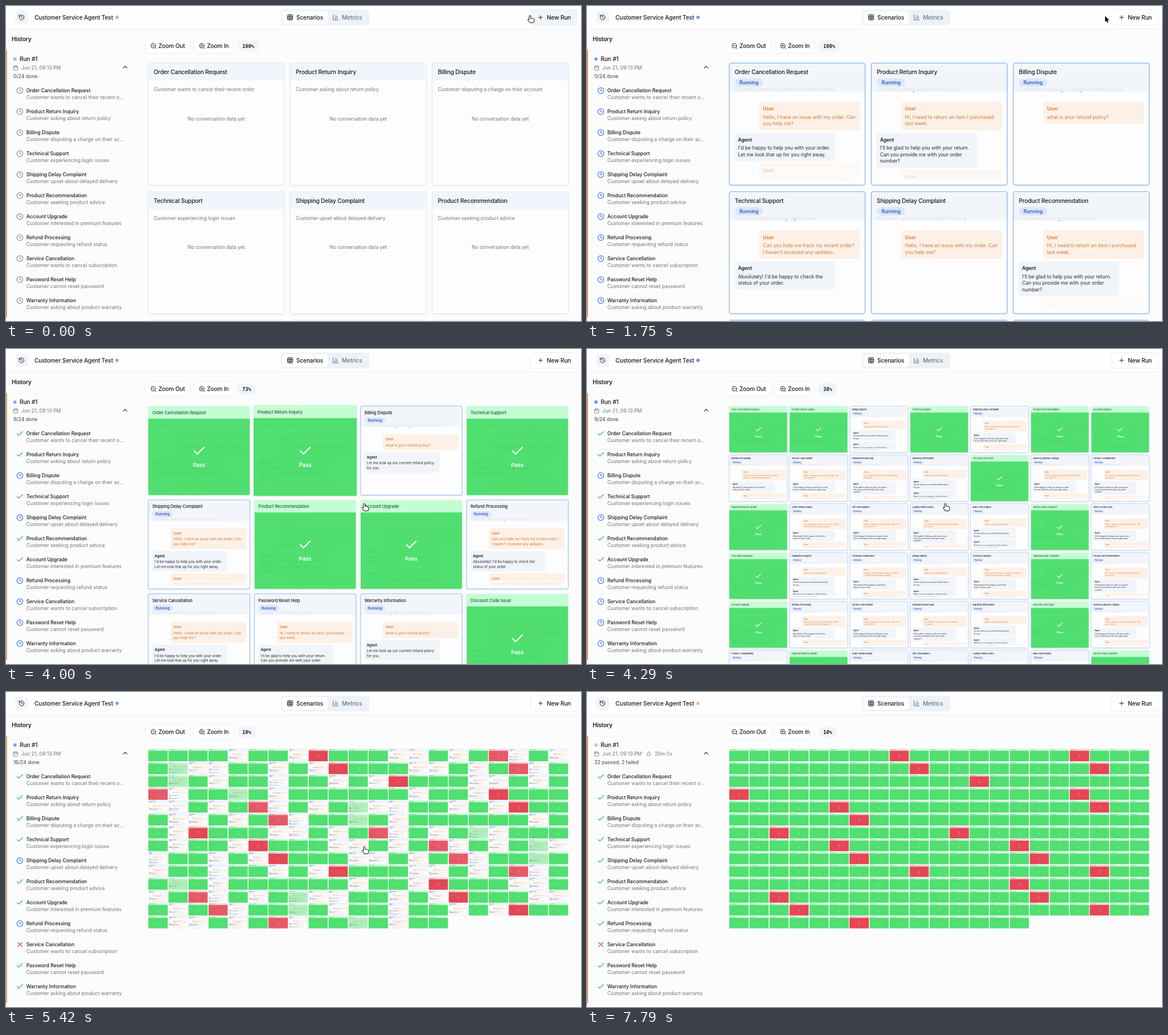
An HTML page with a canvas for the animation above (7830 ms loop, 1010 by 555 pixels).

```html
<!DOCTYPE html>
<html lang="en">
<head>
<meta charset="utf-8">
<title>Agent test run</title>
<style>
  html, body { margin: 0; width: 100%; height: 100%; overflow: hidden; background: #fcfcfd; }
  canvas { display: block; }
</style>
</head>
<body>
<canvas id="stage" width="1010" height="555"></canvas>
<script>
const ctx = document.getElementById('stage').getContext('2d');
const LOOP = 7830, START = 420, END = 7000;
const INK = '#18181b', GREY = '#6b7280', BLUE = '#2f62e0';

const icons = {
  history: 'M3 12a9 9 0 1 0 9-9 9.75 9.75 0 0 0-6.74 2.74L3 8M3 3v5h5M12 7v5l4 2',
  grid: 'M5 3h14a2 2 0 0 1 2 2v14a2 2 0 0 1-2 2H5a2 2 0 0 1-2-2V5a2 2 0 0 1 2-2zM3 9h18M3 15h18M9 3v18M15 3v18',
  chart: 'M3 3v18h18M18 17V9M13 17V5M8 17v-3',
  plus: 'M5 12h14M12 5v14',
  zoomOut: 'M19 11a8 8 0 1 1-16 0 8 8 0 0 1 16 0zM21 21l-4.35-4.35M8 11h6',
  zoomIn: 'M19 11a8 8 0 1 1-16 0 8 8 0 0 1 16 0zM21 21l-4.35-4.35M8 11h6M11 8v6',
  calendar: 'M8 2v4M16 2v4M3 10h18M5 4h14a2 2 0 0 1 2 2v14a2 2 0 0 1-2 2H5a2 2 0 0 1-2-2V6a2 2 0 0 1 2-2z',
  timer: 'M10 2h4M12 14l3-3M20 14a8 8 0 1 1-16 0 8 8 0 0 1 16 0z',
  up: 'M18 15l-6-6-6 6',
  clock: 'M22 12a10 10 0 1 1-20 0 10 10 0 0 1 20 0zM12 6v6l4 2',
  check: 'M20 6L9 17l-5-5',
  cross: 'M18 6L6 18M6 6l12 12'
};
for (const k in icons) icons[k] = new Path2D(icons[k]);
const hand = new Path2D('M-1.5 1.2C-1.5-.6 1.3-.6 1.3 1.2V5.2C2 4.6 3.5 4.8 3.7 5.7 4.6 5.2 5.8 5.6 6 6.4 7 6.1 8 6.7 8 7.8V9.5C8 11 7 12 6.7 13.5H-.2C-1 12-3 10-4 8.2-4.4 7.2-3.2 6.6-2.4 7.3L-1.5 8.2Z');
const arrow = new Path2D('M0 0V11.5L2.6 9.2 4.3 13 6.2 12.2 4.5 8.5H8Z');

const scenarios = [
  ['Order Cancellation Request', 'wants to cancel their recent order'],
  ['Product Return Inquiry', 'asking about return policy'],
  ['Billing Dispute', 'disputing a charge on their account'],
  ['Technical Support', 'experiencing login issues'],
  ['Shipping Delay Complaint', 'upset about delayed delivery'],
  ['Product Recommendation', 'seeking product advice'],
  ['Account Upgrade', 'interested in premium features'],
  ['Refund Processing', 'requesting refund status'],
  ['Service Cancellation', 'wants to cancel subscription'],
  ['Password Reset Help', 'cannot reset password'],
  ['Warranty Information', 'asking about product warranty'],
  ['Discount Code Issue', 'has an invalid discount code'],
  ['Delivery Address Change', 'wants to change address'],
  ['Product Compatibility', 'asking about compatibility'],
  ['Payment Method Update', 'updating payment details'],
  ['Order Status Inquiry', 'checking order status'],
  ['Gift Card Balance', 'checking gift card balance'],
  ['Loyalty Points Query', 'asking about loyalty points'],
  ['Bulk Order Inquiry', 'wants to place a bulk order'],
  ['Service Hours Question', 'asking about opening hours'],
  ['Store Locator Help', 'looking for a nearby store'],
  ['Price Match Request', 'requesting a price match'],
  ['Installation Support', 'needs installation help'],
  ['Feedback Submission', 'wants to leave feedback']
];

// Each message: speaker, then its lines
const talks = [
  [['User', 'Hello, I have an issue with my order. Can', 'you help me?'],
   ['Agent', "I'd be happy to help you with your order.", 'Let me look that up for you right away.'],
   ['User', 'Thank you! The tracking shows it was', 'delivered yesterday.']],
  [['User', 'Hi, I need to return an item I purchased', 'last week.'],
   ['Agent', "I'll be glad to help you with your return.", 'Can you provide me with your order', 'number?'],
   ['User', 'My order number is on the receipt.']],
  [['User', 'what is your refund policy?'],
   ['Agent', 'Let me look up our current refund policy', 'for you.'],
   ['Agent', "Based on our company's refund policy,", 'you can ask for a full refund.']],
  [['User', 'Can you help me track my recent order?', "I haven't received any updates."],
   ['Agent', "Absolutely! I'd be happy to check the", 'status of your order.'],
   ['User', "I placed it 5 days ago and haven't heard", 'anything since.']]
];
const paces = [510, 480, 1700, 700, 1300, 520];

// Order in which the 24 cards of a batch finish; batches come in two arrangements
const finish = {
  A: [1, 11, 5, 14, 6, 19, 0, 3, 21, 2, 8, 9, 10, 16, 17, 22, 4, 7, 12, 13, 15, 18, 20, 23],
  B: [2, 4, 9, 12, 17, 18, 20, 22, 23, 1, 6, 7, 8, 14, 15, 19, 0, 3, 5, 10, 11, 13, 16, 21]
};
const doneTime = rank =>
  rank < 6 ? 2500 + 100 * rank :
  rank < 9 ? 3300 + 200 * (rank - 6) :
  rank < 16 ? 4650 + 110 * (rank - 9) : 5550 + 190 * (rank - 16);

const cards = Array.from({ length: 288 }, (_, i) => {
  const kind = 'ABBABAABBABB'[i / 24 | 0], slot = i % 24;
  const id = kind === 'A' ? slot : (slot + 2) % 24;
  return {
    name: scenarios[id][0], about: 'Customer ' + scenarios[id][1],
    talk: talks[id % 4], pace: paces[id % 6],
    done: doneTime(finish[kind].indexOf(slot)), fail: id === 8 || id === 17
  };
});

const clamp = v => Math.max(0, Math.min(1, v));

function setFont(size, weight = 400, family = 'Inter, sans-serif') {
  ctx.font = `${weight} ${size}px ${family}`;
  ctx.letterSpacing = size > 9 && size < 11 ? '-0.12px' : '0px';
}

// y is the middle of the capitals
function text(s, x, y, size, color = INK, weight = 400, align = 'left') {
  setFont(size, weight);
  ctx.fillStyle = color;
  ctx.textAlign = align;
  ctx.fillText(s, x, y + size * .36);
}

function box(x, y, w, h, r, fill, line) {
  ctx.beginPath();
  ctx.roundRect(x, y, w, h, r);
  if (fill) { ctx.fillStyle = fill; ctx.fill(); }
  if (line) { ctx.strokeStyle = line; ctx.lineWidth = 1; ctx.stroke(); }
}

function icon(name, x, y, size, color, width = 2) {
  ctx.save();
  ctx.translate(x - size / 2, y - size / 2);
  ctx.scale(size / 24, size / 24);
  ctx.strokeStyle = color;
  ctx.lineWidth = width;
  ctx.lineCap = ctx.lineJoin = 'round';
  ctx.stroke(icons[name]);
  ctx.restore();
}

function dot(x, y, r, color) {
  ctx.beginPath();
  ctx.arc(x, y, r, 0, 7);
  ctx.fillStyle = color;
  ctx.fill();
}

function ellipsis(s, max) {
  setFont(8.66);
  if (ctx.measureText(s).width <= max) return s;
  while (ctx.measureText(s + '...').width > max) s = s.slice(0, -1);
  return s + '...';
}

function statusDot(x, y, r, t) {
  if (t >= END) return dot(x, y, r, '#f4bb8d');
  const glow = .5 - .5 * Math.cos(Math.max(0, t - 1165) / 2400 * 2 * Math.PI);
  dot(x, y, r, `rgba(59,130,246,${.5 + .5 * glow})`);
}

function topBar(t, hover) {
  box(0, 0, 1010, 40, 0, '#fefefe');
  box(0, 40, 1010, 1, 0, '#f1f2f5');
  box(16, 8.5, 23, 23, 5, '#f1f5f9');
  icon('history', 27.3, 20, 11.5, INK);
  text('Customer Service Agent Test', 50, 20, 10.1, INK, 500);
  statusDot(195, 20, 3, t);
  box(483, 6.5, 155, 27.5, 6, '#eef2f6');
  box(485.5, 9, 80, 22.5, 5, '#fff');
  icon('grid', 499, 20, 12, INK);
  text('Scenarios', 510, 20, 10.1, INK, 500);
  icon('chart', 579, 20, 12, '#64748b');
  text('Metrics', 590, 20, 10.1, '#64748b', 500);
  box(921.5, 6.5, 82.5, 27.5, 5, hover ? '#f1f5f9' : '#fff', '#e9edf2');
  icon('plus', 939, 20, 11.5, INK);
  text('New Run', 950, 20, 10.1, INK, 500);
}

function sidebar(t) {
  text('History', 10, 58.5, 10.1, INK, 600);
  box(0, 77.5, 229, 1, 0, '#f4f5f7');
  box(0, 78, 1.5, 470, 0, '#ee7a2b');
  statusDot(15.7, 93.5, 2.9, t);
  text('Run #1', 24, 93.5, 10.1, INK, 500);
  icon('calendar', 17, 109, 9.5, GREY);
  text('Jun 21, 09:13 PM', 27, 109, 8.66, GREY);
  icon('up', 209.3, 107.7, 13, INK);
  const count = cards.slice(0, 24).filter(c => t >= c.done).length;
  if (t >= END) {
    icon('timer', 108.5, 109, 9.5, GREY);
    text('20m 0s', 119, 109, 8.66, GREY);
  }
  text(t >= END ? '22 passed, 2 failed' : count + '/24 done', 13, 123.5, 8.66, '#3f3f46');
  for (let i = 0; i < 11; i++) {
    const c = cards[i], y = 149 + 37 * i;
    if (t < c.done) icon('clock', 24.3, y, 12.5, t < START ? '#7b7f87' : BLUE);
    else if (c.fail) icon('cross', 24.3, y, 14, '#dc3545');
    else icon('check', 24.3, y, 14, '#2fb45c');
    text(c.name, 35.7, y, 8.6, INK, 500);
    text(ellipsis(c.about, 172), 35.7, y + 11.5, 8.66, GREY);
  }
}

function toolbar(zoom) {
  box(244.5, 57.5, 79, 26, 5, '#fff', '#e9edf2');
  icon('zoomOut', 259.3, 70.5, 12, INK);
  text('Zoom Out', 267.7, 70.5, 10.1, INK, 500);
  box(330, 57.5, 70, 26, 5, '#fff', '#e9edf2');
  icon('zoomIn', 344.5, 70.5, 12, INK);
  text('Zoom In', 353, 70.5, 10.1, INK, 500);
  const label = Math.round(zoom * 100) + '%';
  setFont(8.66, 700, '"DejaVu Sans Mono", monospace');
  box(406, 60, ctx.measureText(label).width + 18, 21, 10.5, '#f1f5f9');
  ctx.fillStyle = INK;
  ctx.textAlign = 'left';
  ctx.fillText(label, 415, 73.7);
}

function messages(c, t, w) {
  const wide = (w - 19) * .8;
  let y = 69;
  c.talk.forEach(([who, ...lines], k) => {
    const shown = clamp((t - 640 - k * c.pace) / 250);
    if (!shown) return;
    const user = who === 'User', x = user ? w - 9.5 - wide : 9.5;
    const h = 37 + 11.6 * (lines.length - 1);
    ctx.globalAlpha = shown;
    box(x, y, wide, h, 3.5, user ? '#fdf1e7' : '#f1f5f9', user ? '#fcebdc' : '#f1f5f9');
    text(who, x + 5.7, y + 11.5, 8.5, user ? '#d9772f' : INK, 600);
    lines.forEach((s, n) => text(s, x + 5.7, y + 26 + 11.6 * n, 8.5, user ? '#d3763a' : '#27272a'));
    y += h + 6;
  });
  ctx.globalAlpha = 1;
  const fade = ctx.createLinearGradient(0, 190, 0, 209);
  fade.addColorStop(0, 'rgba(253,253,254,0)');
  fade.addColorStop(1, '#fdfdfe');
  ctx.fillStyle = fade;
  ctx.fillRect(0, 190, w, 26);
}

function drawCard(c, i, t, zoom) {
  const gap = 11 * zoom;
  const cols = Math.floor((737.5 + gap) / (235 * zoom + 10.5));
  const pitch = (737.5 + gap) / cols;
  const x = 250 + i % cols * pitch, y = 100.5 + (i / cols | 0) * 226.5 * zoom;
  if (y > 555) return;
  const w = (pitch - gap) / zoom, h = 215;
  const running = t >= START && t < c.done;
  const over = clamp((t - c.done) / 250);
  ctx.save();
  ctx.translate(x, y);
  ctx.scale(zoom, zoom);
  if (i === 1 && t < 4060) {
    const grow = 1 + .018 * clamp((t - 3130) / 150);
    ctx.translate(w / 2, h / 2);
    ctx.scale(grow, grow);
    ctx.translate(-w / 2, -h / 2);
  }
  ctx.save();
  if (zoom > .3) {
    ctx.shadowColor = 'rgba(30,50,80,.14)';
    ctx.shadowBlur = 3;
    ctx.shadowOffsetY = 1;
  }
  box(0, 0, w, h, 3, '#fdfdfe');
  ctx.restore();

  ctx.save();
  box(0, 0, w, h, 3);
  ctx.clip();
  if (over < 1 || zoom > .18) {
    text(c.about, 9.5, 46.5, 8.5, GREY);
    if (t < 640) text('No conversation data yet', w / 2, 98, 8.5, GREY, 400, 'center');
    else messages(c, t, w);
  }
  box(0, 0, w, running ? 50.5 : 30.5, 0, running ? 'rgba(240,245,250,.86)' : '#f0f6fb');
  if (over) {
    ctx.globalAlpha = over;
    box(0, 0, w, 30.5, 0, c.fail ? '#fecdd0' : '#c4fdd4');
    ctx.globalAlpha = .94 * over;
    box(0, 30.5, w, h, 0, c.fail ? '#e33c4c' : '#46dd68');
    ctx.globalAlpha = over;
    icon(c.fail ? 'cross' : 'check', w / 2, 108.5, 34.6, '#fff');
    text(c.fail ? 'Fail' : 'Pass', w / 2, 142, 13, '#fff', 600, 'center');
    ctx.globalAlpha = 1;
  }
  ctx.restore();

  text(c.name, 9.5, 16, 10.1, over ? (c.fail ? '#7f1d1d' : '#235a38') : INK, 500);
  if (running) {
    box(9.5, 27, 50, 15, 7.5, '#dbe7fd');
    text('Running', 34.5, 34.5, 8.6, '#2345b0', 500, 'center');
  }
  if (!over) box(0, 0, w, h, 3, null, running ? '#6ea8f3' : '#e6ebf1');
  ctx.restore();
}

const path = [
  [0, 920.5, 17], [500, 920.5, 17], [740, 910, 17.5], [2300, 910, 17.5], [3000, 714, 188],
  [3250, 714, 188], [3700, 629.5, 272.5], [6900, 629.5, 272.5], [7230, 640, 570], [LOOP, 640, 570]
];
function pointer(t) {
  const n = path.findIndex(p => p[0] > t);
  const [t0, x0, y0] = path[n - 1], [t1, x1, y1] = path[n];
  const u = (t - t0) / (t1 - t0), e = u * u * (3 - 2 * u);
  return [x0 + (x1 - x0) * e, y0 + (y1 - y0) * e];
}

function drawPointer(x, y, hover) {
  const link = hover || (x > 250 && x < 988 && y > 100);
  ctx.save();
  ctx.translate(x, y);
  ctx.scale(.92, .92);
  ctx.lineJoin = 'round';
  ctx.lineWidth = link ? 1.1 : 1.6;
  ctx.strokeStyle = link ? '#111' : '#fff';
  ctx.fillStyle = link ? '#fff' : '#000';
  const shape = link ? hand : arrow;
  ctx.stroke(shape);
  ctx.fill(shape);
  if (link) {
    ctx.lineWidth = .8;
    ctx.stroke(shape);
  }
  ctx.restore();
}

function draw(t) {
  const zoom = Math.round(100 * Math.max(.1, Math.exp(-.00222 * Math.max(0, t - 3858)))) / 100;
  const [x, y] = pointer(t), hover = x >= 919 && y < 34;
  box(0, 0, 1010, 555, 0, '#fcfcfd');
  cards.forEach((c, i) => { if (i !== 1) drawCard(c, i, t, zoom); });
  drawCard(cards[1], 1, t, zoom);
  topBar(t, hover);
  sidebar(t);
  toolbar(zoom);
  drawPointer(x, y, hover);
}

const begin = performance.now();
(function tick() {
  draw((performance.now() - begin) % LOOP);
  requestAnimationFrame(tick);
})();
</script>
</body>
</html>
```
